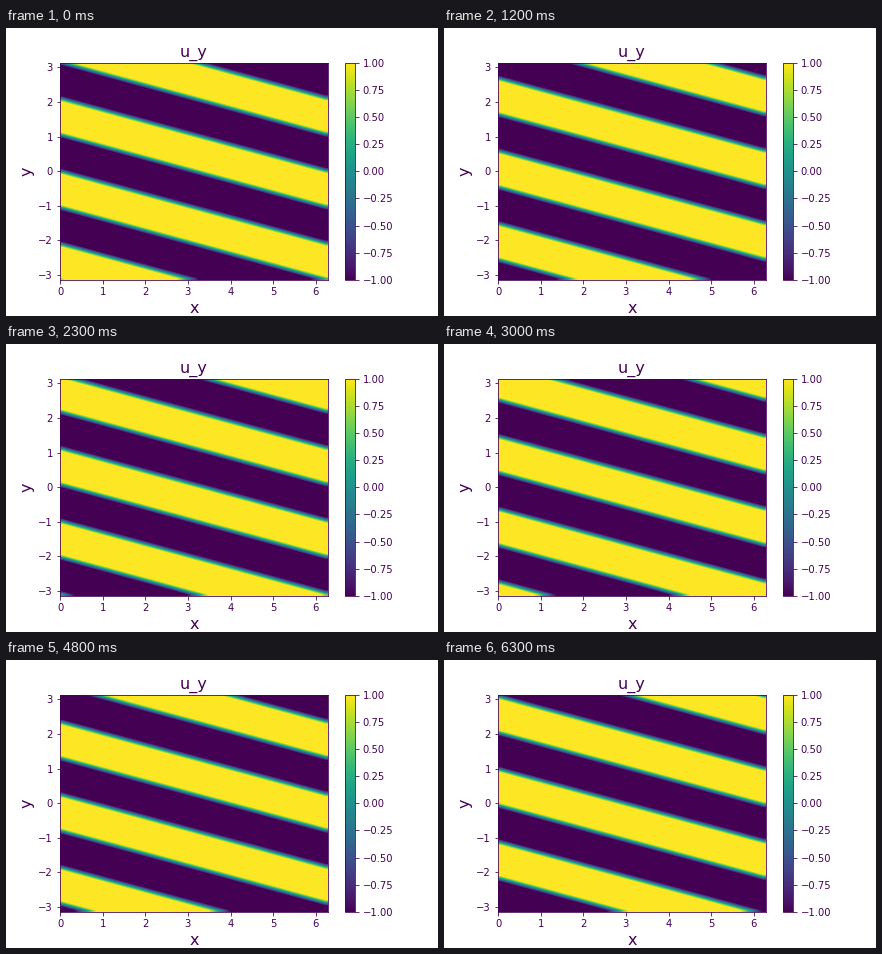
Write a matplotlib script that moves like this. It is 432x288 px and loops after 6400 ms.

```python
import numpy as np
import matplotlib.pyplot as plt
from matplotlib.animation import FuncAnimation

FRAMES = 64
INTERVAL = 100
CELLS = 64
GAIN = 4.0           # steepness of the band edges before clipping
PHASE_STEP = 0.1465  # radians per frame
INK = "#440154"

plt.rcParams.update({
    "font.family": "DejaVu Sans",
    "font.size": 10,
    "figure.subplot.bottom": 0.125,
    "text.color": INK,
    "axes.labelcolor": INK,
    "axes.edgecolor": INK,
    "xtick.color": INK,
    "ytick.color": INK,
})

centres = (np.arange(CELLS) + 0.5) / CELLS * 2 * np.pi
X, Y = np.meshgrid(centres, centres - np.pi)


def wave(frame):
    """Plane wave with wave vector (1, 3) at the given frame."""
    return -GAIN * np.sin(X + 3 * Y - PHASE_STEP * frame)


fig, ax = plt.subplots(figsize=(6, 4), dpi=72)
image = ax.imshow(wave(0), origin="lower", aspect="auto", cmap="viridis",
                  vmin=-1, vmax=1, interpolation="bilinear",
                  extent=[0, 2 * np.pi, -np.pi, np.pi])
ax.set_title("u_y", fontsize=16)
ax.set_xlabel("x", fontsize=16)
ax.set_ylabel("y", fontsize=16)
ax.set_xticks(range(7))
ax.set_yticks(range(-3, 4))

bar = fig.colorbar(image, ax=ax, ticks=np.linspace(-1, 1, 9))
bar.ax.set_yticklabels([f"{v:.2f}".replace("-", "\u2212")
                        for v in np.linspace(-1, 1, 9)])


def update(frame):
    image.set_data(wave(frame))
    return [image]


anim = FuncAnimation(fig, update, frames=FRAMES, interval=INTERVAL,
                     repeat=True, repeat_delay=0)
plt.show()
```
